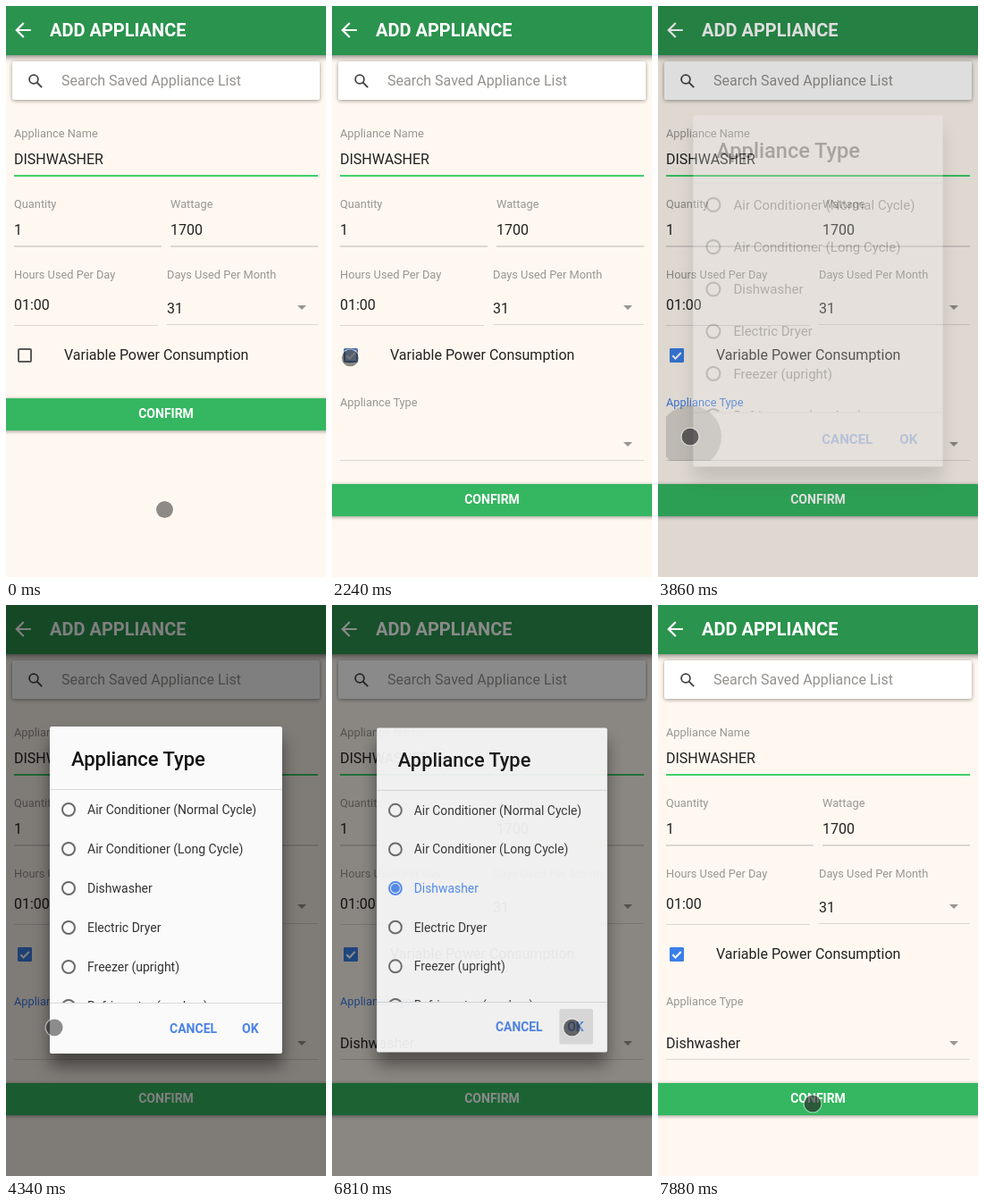
Animation, 358 px wide and 639 px high, one loop 8000 ms. Source, as an HTML page:

```html
<!DOCTYPE html>
<html lang="en">
<head>
<meta charset="utf-8">
<title>Add appliance</title>
<style>
  html, body { margin: 0; width: 100%; height: 100%; overflow: hidden; background: #fff8f0; }
  svg { display: block; width: 100%; height: 100%; }
  text { font: 16px Roboto, sans-serif; fill: #222; }
  .label { font-size: 12.8px; fill: #999590; }
  .label.focus { fill: #3f80ea; }
  .rule { fill: #dcd7d2; }
  .caret { fill: #99958f; }
  .title { font-size: 20px; font-weight: 700; fill: #fff; }
  .button { font-size: 14px; font-weight: 700; fill: #fff; }
  .action { font-size: 14px; font-weight: 700; fill: #4a82e8; }
  .raised { filter: drop-shadow(0 1px 2px rgba(0, 0, 0, .4)); }
  .header { filter: drop-shadow(0 2px 3px rgba(0, 0, 0, .5)); }
  .heading { font-size: 22px; font-weight: 500; fill: #111; }
  .option text { font-size: 14px; fill: #333; }
  .option circle { fill: none; stroke: #6a6a6a; stroke-width: 2; }
  .option .dot { display: none; fill: #4f8bf4; stroke: none; }
  .option.on text { fill: #4f8bf4; }
  .option.on circle { stroke: #4f8bf4; }
  .option.on .dot { display: inline; }
  #dialog { transform-origin: 179px 319px; }
  #panel { filter: drop-shadow(0 14px 9px rgba(0, 0, 0, .45)); }
</style>
</head>
<body>
<svg viewBox="0 0 358 639">
  <defs>
    <clipPath id="checkRow"><rect y="368" width="358" height="46"/></clipPath>
    <clipPath id="selectRow"><rect x="9" y="445" width="340" height="64"/></clipPath>
    <clipPath id="optionRow"><rect x="49" y="295" width="260" height="44"/></clipPath>
    <clipPath id="list"><rect x="49" y="207" width="260" height="238"/></clipPath>
  </defs>

  <rect width="358" height="639" fill="#fff8f0"/>

  <rect class="header" x="-9" y="-9" width="376" height="64" fill="#2a934d"/>
  <path transform="translate(5.8 13.8) scale(1.1)" fill="#fff"
    d="M20 11H7.83l5.59-5.59L12 4l-8 8 8 8 1.41-1.41L7.83 13H20z"/>
  <text class="title" x="49" y="34">ADD APPLIANCE</text>

  <rect class="raised" x="7" y="62" width="344" height="43" rx="2" fill="#fff"/>
  <g fill="none" stroke="#444" stroke-width="1.8">
    <circle cx="31" cy="82" r="4.9"/><path d="M34.5 85.5l5.7 5.7"/>
  </g>
  <text x="62" y="89" style="fill:#94918e">Search Saved Appliance List</text>

  <text class="label" x="9" y="147">Appliance Name</text>
  <text x="9" y="177">DISHWASHER</text>
  <rect x="9" y="189" width="340" height="2" fill="#3fd069"/>

  <text class="label" x="9" y="226">Quantity</text>
  <text x="9" y="256">1</text>
  <rect class="rule" x="9" y="268" width="165" height="2"/>
  <text class="label" x="184" y="226">Wattage</text>
  <text x="184" y="256">1700</text>
  <rect class="rule" x="184" y="268" width="165" height="2"/>

  <text class="label" x="9" y="305">Hours Used Per Day</text>
  <text x="9" y="340">01:00</text>
  <rect class="rule" x="9" y="357" width="161" height="1"/>
  <text class="label" x="180" y="305">Days Used Per Month</text>
  <text x="180" y="344">31</text>
  <path class="caret" d="M326 335h10l-5 5z"/>
  <rect class="rule" x="180" y="356" width="169" height="1"/>

  <rect x="14" y="384" width="14" height="14" rx="1" fill="none" stroke="#5c5a58" stroke-width="2"/>
  <g id="check">
    <rect x="13" y="383" width="16" height="16" rx="2" fill="#3a7fe8"/>
    <path d="M16.3 391.3l3.2 3.2 6.3-6.5" fill="none" stroke="#fff" stroke-width="2"/>
  </g>
  <text x="65" y="396">Variable Power Consumption</text>
  <g clip-path="url(#checkRow)"><circle id="checkRipple" cx="20" cy="392"/></g>

  <g id="type">
    <text class="label" id="typeLabel" x="9" y="448">Appliance Type</text>
    <text id="typeValue" x="9" y="496">Dishwasher</text>
    <path class="caret" d="M326 488h10l-5 5z"/>
    <rect class="rule" x="9" y="508" width="340" height="1"/>
    <g clip-path="url(#selectRow)"><circle id="selectRipple" cx="36" cy="482"/></g>
  </g>

  <g id="confirm">
    <rect class="raised" x="-4" y="439" width="366" height="36" fill="#34b760"/>
    <text class="button" x="179" y="461" text-anchor="middle">CONFIRM</text>
  </g>

  <rect id="backdrop" width="358" height="639"/>

  <g id="dialog">
    <rect id="panel" x="49" y="136" width="260" height="366" rx="2" fill="#fafafa"/>
    <text class="heading" x="73" y="180">Appliance Type</text>
    <g id="options" clip-path="url(#list)"></g>
    <g clip-path="url(#optionRow)"><circle id="optionRipple" cx="71" cy="317"/></g>
    <path d="M49 206.5h260M49 445.5h260" stroke="#d9d9d9"/>
    <rect id="okActive" x="255" y="453" width="38" height="40" rx="2" fill="#dedede"/>
    <text class="action" x="183" y="478.5">CANCEL</text>
    <text class="action" x="264" y="478.5">OK</text>
  </g>

  <g id="cursor">
    <circle id="disc" r="9.6" fill="#262626"/>
    <circle r="10" fill="none" stroke="#fff" stroke-opacity=".5" stroke-width="1.2"/>
  </g>
</svg>
<script>
const LOOP = 8000, TICK = 77;
const $ = id => document.getElementById(id);
const show = (id, on) => { $(id).style.display = on ? '' : 'none'; };

const names = ['Air Conditioner (Normal Cycle)', 'Air Conditioner (Long Cycle)', 'Dishwasher',
  'Electric Dryer', 'Freezer (upright)', 'Refrigerator (modern)'];
$('options').innerHTML = names.map((name, i) => {
  const y = 229 + 44 * i;
  return `<g class="option"><circle cx="70" cy="${y}" r="7"/>` +
    `<circle class="dot" cx="70" cy="${y}" r="4"/><text x="91" y="${y + 5}">${name}</text></g>`;
}).join('');
const choice = $('options').children[2];

const smooth = p => p * p * (3 - 2 * p);
const linear = p => p;
const easeIn = p => p ** 2.3;
const lateEase = p => p ** 3.6;

// The cursor glides from its last place to each next one, bent towards `bend`.
const home = [177.5, 563.5];
const moves = [
  { start: 680, end: 1450, to: [19.5, 388] },
  { start: 1850, end: 1920, to: [20, 392], tap: true },
  { start: 2240, end: 3010, to: [35, 477] },
  { start: 3090, end: 3330, to: [36, 482], tap: true },
  { start: 4340, end: 5030, to: [71, 317], bend: [135, 440], ease: linear, tap: true },
  { start: 5410, end: 6180, to: [238, 468], bend: [152, 317], ease: easeIn },
  { start: 6260, end: 6560, to: [268.5, 473], bend: [256, 432], tap: true },
  { start: 7110, end: 7880, to: [173, 558], tap: true }
];

const ticksSince = (t, start) => Math.floor((t - start) / TICK + .1);

// Progress from 0 to 1, held between ticks; the first change falls on `start`.
function progress(t, start, end) {
  const steps = Math.round((end - start) / TICK) + 1;
  return t < start ? 0 : Math.min(1, (ticksSince(t, start) + 1) / steps);
}

function renderCursor(t) {
  const i = moves.findLastIndex(m => t >= m.start);
  let place = home, pressed = false;
  if (i >= 0) {
    const { start, end, to, bend, ease = smooth, tap } = moves[i];
    const from = i ? moves[i - 1].to : home;
    const u = ease(progress(t, start, end));
    place = to.map((goal, axis) => {
      const middle = bend ? bend[axis] : (from[axis] + goal) / 2;
      return from[axis] * (1 - u) ** 2 + 2 * middle * u * (1 - u) + goal * u * u;
    });
    pressed = tap && t >= end;
  }
  $('cursor').setAttribute('transform', `translate(${place})`);
  $('disc').setAttribute('opacity', pressed ? .65 : .52);
}

function renderRipple(id, t, start) {
  const age = ticksSince(t, start) / 5;
  const on = t >= start && age < 1;
  show(id, on);
  if (!on) return;
  $(id).setAttribute('r', 8 + 135 * age);
  $(id).setAttribute('opacity', .18 * (1 - age));
}

function renderDialog(t) {
  const entered = smooth(progress(t, 3790, 4170));
  const left = lateEase(progress(t, 6730, 6960));
  const shown = entered - left;
  $('backdrop').style.opacity = shown / 2;
  $('dialog').style.opacity = shown;
  $('dialog').style.transform = `scale(${1.1 - .1 * (entered + left)})`;
  show('dialog', shown > 0);
  show('okActive', t >= 6730);
  choice.classList.toggle('on', t >= 5410);
}

function render(t) {
  const expanded = t >= 2240;
  show('type', expanded);
  $('confirm').setAttribute('transform', `translate(0 ${expanded ? 96 : 0})`);
  $('check').style.opacity = progress(t, 2240, 2240 + TICK);
  $('typeLabel').classList.toggle('focus', t >= 3790 && t < 6960);
  show('typeValue', t >= 6730);
  renderRipple('checkRipple', t, 2240);
  renderRipple('selectRipple', t, 3790);
  renderRipple('optionRipple', t, 5410);
  renderDialog(t);
  renderCursor(t);
}

function frame() {
  render(performance.now() % LOOP);
  requestAnimationFrame(frame);
}
frame();
</script>
</body>
</html>
```
